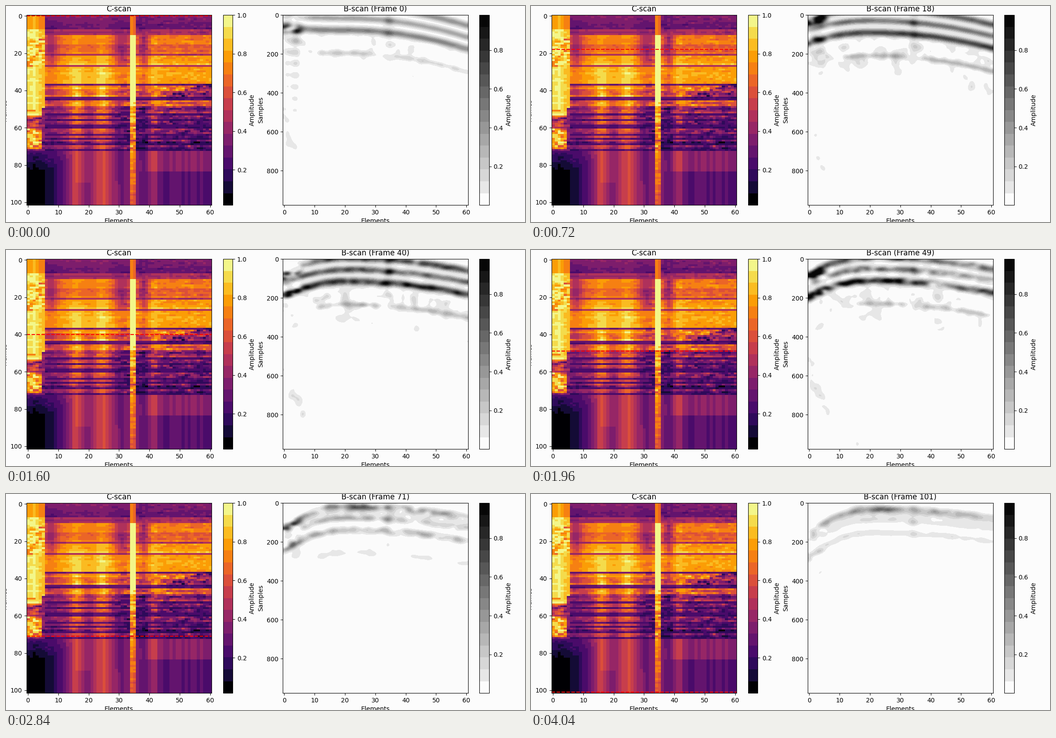
These frames come from a looping animation (1159x483 px, 4080 ms). A matplotlib script:

```python
import numpy as np
import matplotlib.pyplot as plt
from matplotlib.animation import FuncAnimation
from matplotlib.colors import ListedColormap

W, H, DPI = 1159, 483, 100
FRAMES, ELEMS, SAMPLES, ROWS = 102, 61, 978, 245
PAPER = "#fcfcfc"
DROPOUTS = (21, 27, 37, 44, 45, 53, 56, 59, 60, 64, 66, 69, 72)
rng = np.random.default_rng(12)
E = np.arange(ELEMS)
R = np.arange(FRAMES)[:, None]
S = ((np.arange(ROWS) + 0.5) * SAMPLES / ROWS - 0.5)[:, None]


def bump(x, mid, width):
    return np.exp(-0.5 * ((x - mid) / width) ** 2)


def ramp(x, lo, hi):
    return np.clip((x - lo) / (hi - lo), 0, 1)


def smooth_noise(rows, cols, sr, sc):
    """Unit-variance noise, blurred by sr rows and sc columns."""
    fr = np.fft.fftfreq(rows)[:, None]
    fc = np.fft.fftfreq(cols)[None, :]
    blur = np.exp(-2 * np.pi ** 2 * ((fr * sr) ** 2 + (fc * sc) ** 2))
    n = np.fft.ifft2(np.fft.fft2(rng.standard_normal((rows, cols))) * blur).real
    return n / n.std()


# ---------- C-scan ----------
def build_cscan():
    base = np.interp(R, [0, 7, 8, 10, 11, 15, 16, 21, 22, 36, 37, 48, 49, 72, 73],
                     [.34, .3, .42, .42, .7, .7, .6, .67, .76, .81, .64, .62, .42, .36, .38])
    contrast = np.interp(R, [10, 11, 36, 37, 60, 73], [.15, .4, .65, 1.1, 1.7, 1.2])
    dip = np.interp(R, [0, 10, 11, 27, 28, 37, 101], [.02, .04, .24, .24, .09, .1, .05])
    peaks = .17 * bump(E, 16, 1.8) + .18 * bump(E, 24.4, 2) + .12 * bump(E, 41.3, 1.3)
    c = base + contrast * peaks - dip * (bump(E, 31, 2) + bump(E, 38, 1.3) + bump(E, 7.5, 1.5))

    # texture: row streaks, then grain that is coarser on the right
    gain = np.where((R >= 37) & (R < 73), 1, 0.35)
    right = E > 35
    c += 0.04 * gain * rng.standard_normal((FRAMES, 1)) * (R < 73)
    c += 0.05 * right * gain * rng.standard_normal((FRAMES, 1)) * (R < 73)
    grain = smooth_noise(FRAMES, ELEMS, 0.25, 0.5)
    c += gain * (0.035 + 0.05 * ramp(E, 26, 34)) * grain * (R < 73)
    c -= 0.08 * ramp(E, 27, 36) * ((R >= 49) & (R < 73))
    far = (E > 57 - 2 * (R - 37)) & (R >= 37) & (R < 45)
    c = np.where(far, 0.36 + 0.09 * grain, c)
    for r in DROPOUTS:
        c[r, 6:] = 0.25 + 0.25 * (c[r, 6:] - 0.5) + (0.15 if r < 30 else 0)

    # narrow reflector
    beam = np.interp(R, [0, 10, 11, 47, 49, 72, 101], [.68, .68, .97, .96, .78, .74, .62])
    c[:, 34:36] = beam + [0.02, -0.02] + 0.1 * gain * grain[:, 34:36] * (R > 46)

    # bright left block
    edge = np.interp(R, [7, 8, 12, 13, 28, 53, 55, 60, 61, 71],
                     [.77, .92, .92, .84, .92, .92, .5, .5, .8, .76])
    loose = (0.02 + 0.08 * ((R > 12) & (R < 28) | (R > 50))) * (R > 7)
    left = edge + loose * grain + 0.06 * bump(E, 2, 0.7) - 0.06 * ramp(E, 2, 5)
    c = np.where((E < 6 - (R > 49)) & (R < 72), left, c)

    # smooth lower part, dark towards the left
    low = c - 0.12 * ramp(E, 36, 42) * (R > 83) - 0.07 * bump(E, 18, 3) * (R > 89)
    low = low + 0.015 * rng.standard_normal((1, ELEMS))
    fade = ramp(E, 2, 15) ** 1.4
    dark = 0.03 + 0.19 * ramp(R + grain, 83, 73)
    return np.where(R > 72, low * fade + dark * (1 - fade), c)


# ---------- B-scan ----------
speck = [smooth_noise(ROWS, ELEMS, 3.4, 0.6) for _ in range(2)]
ripple = [smooth_noise(ROWS, ELEMS, 2.5, 0.8) for _ in range(2)]


def drift(pair, f, rate):
    return pair[0] * np.cos(rate * f) + pair[1] * np.sin(rate * f)


def echo_depth(f):
    apex = np.interp(f, [0, 18, 30, 49, 61, 101], [80, 92, 122, 113, 136, 154])
    left = np.interp(f, [0, 18, 49, 101], [-.03, .12, .21, .32])
    right = np.interp(f, [0, 30, 101], [.06, .043, .029])
    return apex + np.where(E < 20, left, right) * (E - 20) ** 2


def bscan(f):
    depth = echo_depth(f)
    u = S - depth
    power = np.interp(f, [0, 30, 49, 61, 101], [.47, .9, .74, .27, .11])
    late = ramp(f, 50, 62)
    ring = np.interp(f, [30, 48, 62, 101], [.04, .25, .4, .18])
    jitter = np.clip(1 + (ring + 0.35 * ramp(E, 9, 4)) * drift(ripple, f, 0.19), 0.1, 1.7)

    # layered echoes
    body = ramp(E, -4, 10) * (1 - np.interp(f, [36, 49, 61], [0, .3, .15]) * ramp(E, 30, 36))
    spots = 0.6 + 0.35 * (bump(E, 16, 2.5) + bump(E, 24, 2.3) + bump(E, 41, 2) + 0.5 * bump(E, 48, 1))
    first = body * (1 - late + late * spots)
    lower = body * ramp(E, 10, 12) * (1 - bump(E, 34, 2.2))
    img = (max(0.42, 0.85 * power) * first * bump(u, -120, 13)
           + 0.74 * power * body * bump(u, -61, 12)
           + power * body * bump(u, 0, 13)
           + 0.33 * power * lower * bump(u, 118, 10)
           + 0.08 * late * body * bump(u, -97, 22))

    # narrow reflector
    beam = np.interp(f, [30, 49], [.5, .3]) * bump(E, 34.4, 0.85)
    for n in range(5):
        img += beam * (0.5 + 0.5 * power) * 0.72 ** n * bump(u, -120 + 62 * n, 16)

    # near-edge reverberation
    reach = ramp(E, 6.6, 4)
    edge = np.interp(f, [0, 49, 61, 83, 101], [.95, .8, .6, .35, .2])
    img += edge * reach * (bump(u, -100, 15) + np.interp(f, [0, 8, 30], [1, .35, .6]) * bump(u, 0, 16))
    img *= jitter
    tail = np.interp(f, [0, 18], [.3, .1]) * np.exp(-np.clip(u, 0, None) / 330) * (u > 20)
    img += tail * (bump(E, 3.6, 0.9) + 0.6 * bump(E, 0.9, 0.7)) * (0.55 + 0.45 * np.cos(2 * np.pi * u / 60))

    # scattered haze
    length = 70 + 130 * ramp(E, 8, 12) * ramp(E, 32, 29)
    haze = np.exp(-np.clip(u - 90, 0, None) / length) * ramp(u, 0, 70)
    haze = haze + 0.5 * ramp(E, 36, 38) * bump(u, 215, 28)
    haze = haze + 0.9 * ramp(E, 8, 6) * bump(S, 560 + 45 * E, 70)
    haze = haze + 0.4 * (S > 935) * bump(E, 18, 8) * ramp(f, 60, 50)
    img += min(1.35 * power, 1.1) * haze * (0.065 * drift(speck, f, 0.11) + 0.032)

    return np.clip(img * (0.65 if f in DROPOUTS else 1), 0, 0.98)


# ---------- figure ----------
def steps(name, lowest):
    colors = list(plt.get_cmap(name)((np.arange(16) + 0.5) / 16))
    colors[0] = lowest
    return ListedColormap(colors)


plt.rcParams["font.family"] = "DejaVu Sans"
fig = plt.figure(figsize=(W / DPI, H / DPI), dpi=DPI, facecolor=PAPER)


def box(x, width):
    top, height = 20.1, 425.1
    return fig.add_axes([x / W, 1 - (top + height) / H, width / W, height / H], facecolor=PAPER)


def panel(x, data, rows, cmap, lo, hi, smooth, ylabel):
    """Image with its colour bar, 439 px to the right."""
    ax = box(x, 413.4)
    im = ax.imshow(data, cmap=cmap, vmin=lo, vmax=hi, aspect="auto", interpolation=smooth,
                   interpolation_stage="data", extent=(-0.5, ELEMS - 0.5, rows - 0.5, -0.5))
    ax.set_xlabel("Elements")
    ax.set_ylabel(ylabel)
    fig.colorbar(im, cax=box(x + 439.2, 21.25), label="Amplitude")
    return ax, im


ax_c, _ = panel(45.6, np.clip(build_cscan(), 0.018, 1), FRAMES,
                steps("inferno", (0, 0, 0.012, 1)), 0.0176, 1, "nearest", "Frames")
ax_b, image = panel(618.1, bscan(0), SAMPLES,
                    steps("gray_r", (0.988, 0.988, 0.988, 1)), 0.001, 0.981, "bicubic", "Samples")
ax_c.set_title("C-scan")
title = ax_b.set_title("B-scan (Frame 0)")
cursor = ax_c.axhline(0, color="red", ls="--", lw=1.5)


def update(f):
    image.set_data(bscan(f))
    title.set_text(f"B-scan (Frame {f})")
    cursor.set_ydata([f, f])
    return image, title, cursor


anim = FuncAnimation(fig, update, frames=FRAMES, interval=40, repeat=True, repeat_delay=0)
plt.show()
```
